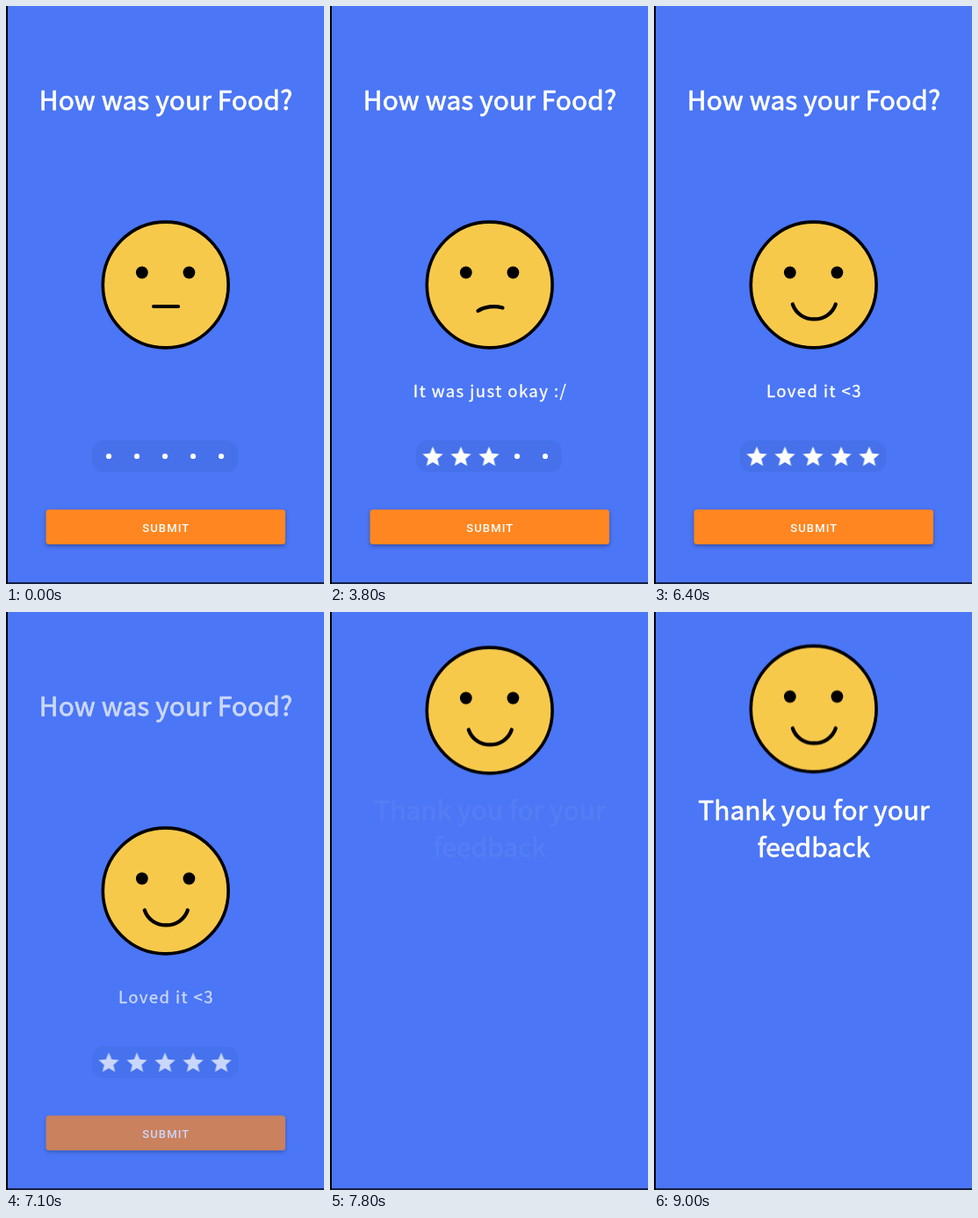
These frames come from a looping animation (362 px wide and 656 px high, 9.1 s). An HTML page:

```html
<!DOCTYPE html>
<html lang="en">
<head>
<meta charset="utf-8">
<title>Food feedback</title>
<style>
  html, body { margin: 0; width: 100%; height: 100%; overflow: hidden; background: #000; }
  svg { display: block; width: 362px; height: 656px; }

  text { fill: #fff; text-anchor: middle; font-family: "Noto Sans CJK JP", "Noto Sans CJK SC", "Noto Sans CJK", sans-serif; }
  /* A thin outline gives the regular face a medium weight */
  .title, .caption { stroke: #fff; stroke-linejoin: round; }
  .title { font-size: 29.9px; letter-spacing: .1px; stroke-width: .75px; }
  .caption { font-size: 18.5px; letter-spacing: 1.45px; stroke-width: .35px; opacity: 0; }
  .submit { font: 500 13px Roboto, sans-serif; letter-spacing: 1.15px; }
  .button { fill: #ff8620; filter: drop-shadow(0 2px 2px rgb(0 0 0 / .32)); }
  .stars { fill: #fff; }
  .star { transform: scale(0); }
  .mouth { fill: none; stroke: #000; stroke-width: 4.2; stroke-linecap: round; stroke-linejoin: round; }

  .form, .face, .thanks, .mouth, .star, .caption { animation: 9.1s linear infinite; }
  .form { animation-name: leave; }
  .face { animation-name: rise; }
  .thanks { animation-name: thank; opacity: 0; }
  .mouth { animation-name: mood; animation-timing-function: ease-in-out; }
  .star { animation-timing-function: ease-out; }
  .star1 { animation-name: star1; }
  .star2 { animation-name: star2; }
  .star3 { animation-name: star3; }
  .star4 { animation-name: star4; }
  .star5 { animation-name: star5; }
  .caption1 { animation-name: caption1; }
  .caption2 { animation-name: caption2; }
  .caption3 { animation-name: caption3; }
  .caption4 { animation-name: caption4; }
  .caption5 { animation-name: caption5; }

  /* Taps at 750, 1950, 3150, 4650 and 5950 ms, each settling in 400 ms */
  @keyframes star1 { 0%, 8.24% { transform: scale(0); } 12.64%, 100% { transform: scale(1); } }
  @keyframes star2 { 0%, 21.43% { transform: scale(0); } 25.82%, 100% { transform: scale(1); } }
  @keyframes star3 { 0%, 34.62% { transform: scale(0); } 39.01%, 100% { transform: scale(1); } }
  @keyframes star4 { 0%, 51.1% { transform: scale(0); } 55.49%, 100% { transform: scale(1); } }
  @keyframes star5 { 0%, 65.38% { transform: scale(0); } 69.78%, 100% { transform: scale(1); } }

  @keyframes caption1 { 0%, 10.44% { opacity: 0; } 12.64%, 21.43% { opacity: 1; } 23.63%, 100% { opacity: 0; } }
  @keyframes caption2 { 0%, 23.63% { opacity: 0; } 25.82%, 34.62% { opacity: 1; } 36.81%, 100% { opacity: 0; } }
  @keyframes caption3 { 0%, 36.81% { opacity: 0; } 39.01%, 51.1% { opacity: 1; } 53.3%, 100% { opacity: 0; } }
  @keyframes caption4 { 0%, 53.3% { opacity: 0; } 55.49%, 65.38% { opacity: 1; } 67.58%, 100% { opacity: 0; } }
  @keyframes caption5 { 0%, 67.58% { opacity: 0; } 69.78%, 100% { opacity: 1; } }

  @keyframes mood {
    0%, 8.24% { d: path("M168 341 C177 341 187 341 196 341"); }
    12.64%, 21.43% { d: path("M167.5 349 C172 336 192 336 197 349"); }
    25.82%, 34.62% { d: path("M167.5 347 C173 339 191 339 196.5 347"); }
    39.01%, 51.1% { d: path("M168.5 346 C176 341 187 340 196.5 342.5"); }
    55.49%, 65.38% { d: path("M163 341 C170 351 194 351 201 341"); }
    69.78%, 100% { d: path("M157.8 338.5 C165.3 361 199.3 361 206.8 338.5"); }
  }

  @keyframes leave { 0%, 76.92% { opacity: 1; } 80.77%, 100% { opacity: 0; } }
  @keyframes rise {
    0%, 79.56% { transform: none; animation-timing-function: ease-in-out; }
    86.15%, 100% { transform: translateY(-206.5px); }
  }
  @keyframes thank { 0%, 85.5% { opacity: 0; } 89.56%, 100% { opacity: 1; } }
</style>
</head>
<body>
<svg viewBox="0 0 362 656">
  <defs>
    <path id="star" transform="scale(1.16) translate(-12 -11.5)"
      d="M12 17.27 18.18 21l-1.64-7.03L22 9.24l-7.19-.61L12 2 9.19 8.63 2 9.24l5.46 4.73L5.82 21z"/>
    <circle id="dot" r="3.1"/>
  </defs>
  <rect x="2" width="360" height="656" fill="#141f45"/>
  <rect x="2" width="360" height="654" fill="#4b76f5"/>

  <g class="form">
    <text class="title" x="182" y="118">How was your Food?</text>

    <text class="caption caption1" x="182.5" y="444">Extremely bad :(</text>
    <text class="caption caption2" x="182.5" y="444">Pretty bad :(</text>
    <text class="caption caption3" x="182.5" y="444">It was just okay :/</text>
    <text class="caption caption4" x="182.5" y="444">It was good :)</text>
    <text class="caption caption5" x="182.5" y="444">Loved it &lt;3</text>

    <rect x="98" y="493" width="166" height="36" rx="13" fill="#4671eb"/>
    <g class="stars">
      <g transform="translate(117 511)"><use href="#dot"/><g class="star star1"><use href="#star"/></g></g>
      <g transform="translate(149 511)"><use href="#dot"/><g class="star star2"><use href="#star"/></g></g>
      <g transform="translate(181 511)"><use href="#dot"/><g class="star star3"><use href="#star"/></g></g>
      <g transform="translate(213 511)"><use href="#dot"/><g class="star star4"><use href="#star"/></g></g>
      <g transform="translate(245 511)"><use href="#dot"/><g class="star star5"><use href="#star"/></g></g>
    </g>

    <rect class="button" x="45.5" y="571.5" width="272.5" height="39.5" rx="3.5"/>
    <text class="submit" x="182.3" y="597">SUBMIT</text>
  </g>

  <g class="face">
    <circle cx="181.7" cy="316.5" r="71.4" fill="#f7c94b" stroke="#000" stroke-width="3.6"/>
    <circle cx="154.8" cy="302.5" r="6.9"/>
    <circle cx="208.4" cy="302.5" r="6.9"/>
    <path class="mouth" d="M168 341 C177 341 187 341 196 341"/>
  </g>

  <g class="thanks title">
    <text x="182" y="235.5">Thank you for your</text>
    <text x="182" y="277.5">feedback</text>
  </g>
</svg>
</body>
</html>
```
